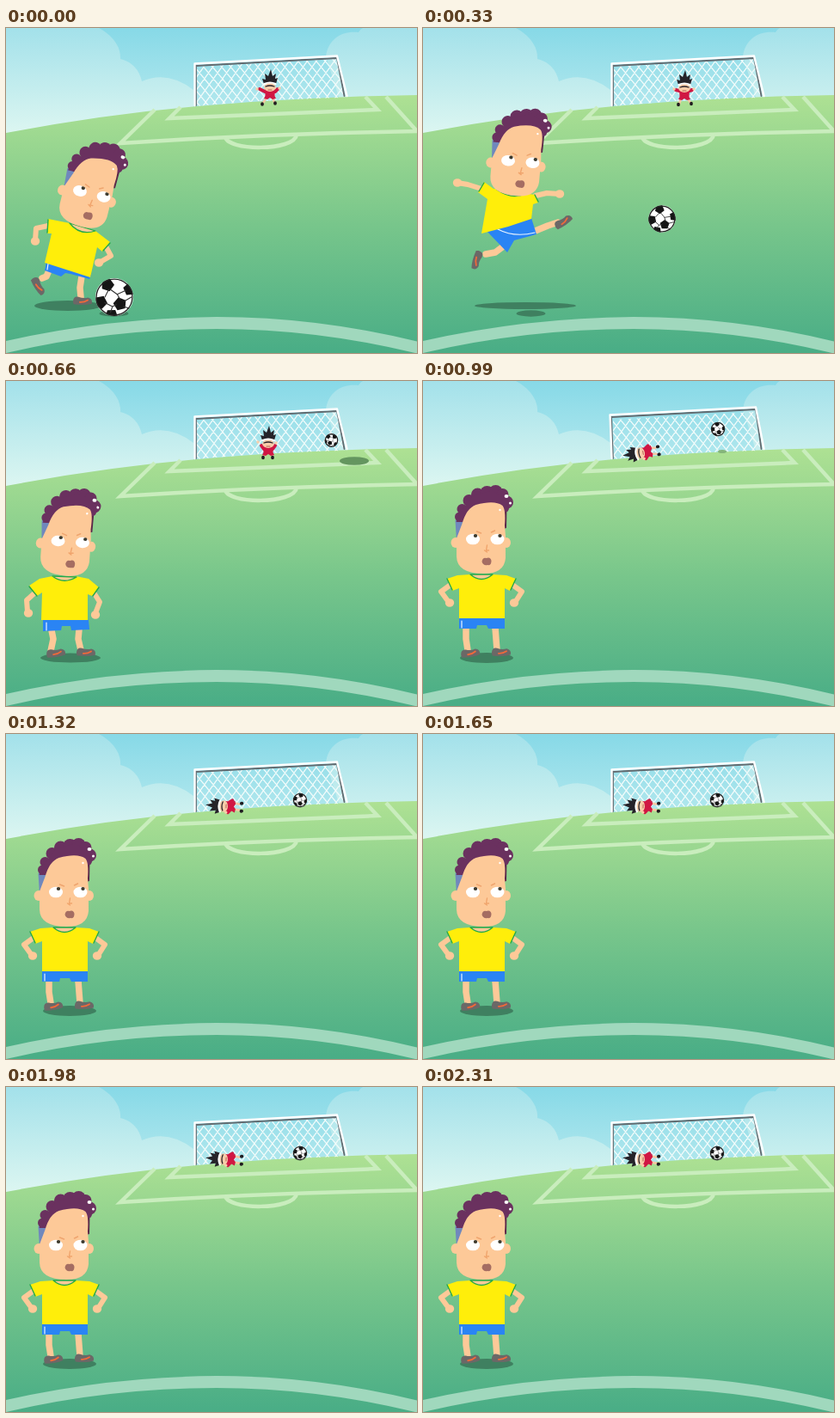
These frames come from a looping animation (478x378 px, 3300 ms). An HTML page:

```html
<!DOCTYPE html>
<html lang="en">
<head>
<meta charset="utf-8">
<title>Penalty kick</title>
<style>
html, body { margin: 0; width: 100%; height: 100%; overflow: hidden; }
svg { display: block; width: 100vw; height: 100vh; }
</style>
</head>
<body>
<svg viewBox="0 0 478 378" fill="none">
  <defs>
    <linearGradient id="sky" x2="0" y2="1"><stop stop-color="#87d9e7"/><stop offset="1" stop-color="#c4eef0"/></linearGradient>
    <linearGradient id="cloud" gradientUnits="userSpaceOnUse" x1="0" y1="0" x2="0" y2="122"><stop stop-color="#a3e1ea"/><stop offset="1" stop-color="#dcf6f1"/></linearGradient>
    <linearGradient id="grass" gradientUnits="userSpaceOnUse" x1="0" y1="78" x2="0" y2="378"><stop stop-color="#aee193"/><stop offset=".5" stop-color="#78c68b"/><stop offset="1" stop-color="#49ad86"/></linearGradient>
    <clipPath id="netClip"><path d="M221 45L385 36L393 81Q300 83 221 91Z"/></clipPath>
    <clipPath id="ballClip"><circle r="1"/></clipPath>
  </defs>
  <path fill="url(#sky)" d="M0 0H478V130H0Z"/>
  <path fill="url(#cloud)" d="M0 0H108C123 8 134 21 133 36Q153 41 158 62Q188 49 218 72V130H0Z"/>
  <path fill="url(#cloud)" d="M478 0H415Q411 2 410 5C390 3 375 13 372 33L390 90H478Z"/>
  <path fill="url(#grass)" d="M0 122Q110 101 222 91Q345 80 478 78V378H0Z"/>
  <g stroke="#c9edbd" stroke-width="4.5">
    <path d="M173 95L133 134Q300 123 478 120L442 80"/>
    <path d="M203 92L190 105L432 95L418 80"/>
    <path d="M255 126C256 143.500 336 143.500 338 124"/>
  </g>
  <path fill="#a0d8bd" d="M0 364Q120 337 245 336Q361 336 478 364.500V378H0Q120 350 245 350Q361 350 478 378.500V364Z" fill-rule="evenodd" style="display:none"/>
  <path fill="#a0d8bd" d="M0 364Q120 337 245 336Q361 336 478 364.500V378.500Q361 350 245 350Q120 350 0 378Z"/>
  <g id="scene"></g>
</svg>
<script>
const SKIN = '#fdc998', RED = '#d01743', STEP = 330, LOOP = 3300;

const path = (d, fill) => `<path d="${d}" fill="${fill}"/>`;
const line = (d, color, width) =>
  `<path d="${d}" stroke="${color}" stroke-width="${width}" stroke-linecap="round" stroke-linejoin="round"/>`;
const oval = (x, y, rx, ry, fill) => `<ellipse cx="${x}" cy="${y}" rx="${rx}" ry="${ry}" fill="${fill}"/>`;
const dot = (x, y, r, fill) => oval(x, y, r, r, fill);
const place = ([x, y, turn = 0, size = 1], body) =>
  `<g transform="translate(${x} ${y}) rotate(${turn}) scale(${size})">${body}</g>`;

// Head drawn around the point midway between the eyes
const curls = [[-30, -26, 5.5], [-27, -35, 6], [-19, -45, 7], [-9, -52, 7.5], [2, -54, 8],
  [12, -55, 8], [20, -52, 7], [25, -43, 7.5], [23, -36, 4.5]];
const head = [
  path('M-35 -22L-24 -28L-24 -14L-33.500 2Z', '#7088bd'),
  path('M18 -40L25 -38L24.500 -13L21 -12Z', '#5a2848'),
  curls.map(([x, y, r]) => dot(x, y, r, '#6a315f')).join(''),
  path('M-34 -20L-30 -30L-15 -50L8 -57L27 -45L20 -32L-24 -20Z', '#6a315f'),
  oval(-34.5, 4, 5.5, 6, SKIN), oval(24.5, 4, 5, 6, SKIN),
  path('M-33.500 -1L-27 -18Q-22 -36 -11 -40Q11 -46 20 -39Q24 -34 22.500 -16L23.500 -4V22Q22 40 -2 40Q-33 40 -33.500 20Z', SKIN),
  oval(-14.5, 0, 8, 6.3, '#fff'), oval(14, 0, 8, 6.3, '#fff'),
  oval(-11.5, -4, 2.2, 1.9, '#3d3a2e'), oval(17, -4, 2.2, 1.9, '#3d3a2e'),
  line('M-10 -9L-5 -7M7 -8L11 -10', '#efa56f', 1.5),
  line('M2 7L1 13H4M-1 13L2 15', '#f0a46c', 1.4),
  path('M-4 26Q-3 21 1 22Q6 20 7 25Q7 31 3 30Q-3 31 -4 26Z', '#a56d62'),
  oval(24.5, -50, 2.4, 2, '#fff'), dot(29, -42, 1.5, '#fff'), dot(17, -34, 1.2, '#fff')
].join('');

const shoe = path('M-11 2Q-11 -5 -5 -4Q1 -2 6 -4Q12 -3 11 3Q2 6 -10 5Z', '#6b6867') +
  line('M-3 2Q2 2 6 -1', '#f2683a', 1.8);

const shadow = (s, color = '#3f8060') => oval(...s, color);

function player({ at, shade, arms, hands, legs, shoes, shorts, stripe, shirt, cuffs, collar }) {
  return shadow(shade) + line(legs, SKIN, 7.5) + shoes.map(s => place(s, shoe)).join('') +
    path(shorts, '#2a84f4') + line(stripe, '#e9f4ff', 1.2) +
    line(arms, SKIN, 6) + hands.map(([x, y]) => oval(x, y, 5.2, 4.8, SKIN)).join('') +
    path(shirt, '#ffee0a') + line(cuffs, '#25a949', 1.4) +
    path(collar, SKIN) + line(collar, '#25a949', 1.3) + place(at, head);
}

const runUp = player({
  at: [100, 193, 14], shade: [72, 323, 39, 6],
  arms: 'M49 230L35 233L34 247M116 254L122 265L110 272', hands: [[34, 248], [108, 273]],
  legs: 'M50 282L47 289L42 291M88 289L86 302L87 313', shoes: [[38, 300, 62], [89, 317, 4]],
  shorts: 'M47 272L99 287L97 292L75 286L69 285L64 289L45 282Z', stripe: 'M49 274L48 281',
  shirt: 'M49 222L74 227L104 236L121 249L112 260L106 255L98 290L45 273L53 239L48 239Z',
  cuffs: 'M49 223L48 238M121 250L113 259', collar: 'M74 227Q86 242 104 236Z'
});
const strike = player({
  at: [113.5, 155.5, 5], shade: [119, 323, 59, 4],
  arms: 'M68 187L52 182L40 180M131 195L144 192L158 193', hands: [[40, 180], [159, 193]],
  legs: 'M96 252L84 261L73 263M128 237L145 230L157 226', shoes: [[63, 270, 110], [163, 225, -30]],
  shorts: 'M74 236L126 221L132 240L106 247L98 261Z', stripe: 'M87 234Q106 244 130 238',
  shirt: 'M71 179L82 187L130 194L134 203L128 205L126 222L99 231L68 239L75 199L64 191Z',
  cuffs: 'M71 180L65 190M130 194L134 202', collar: 'M86 188Q103 200 119 193Z'
});
const land = player({
  at: [75, 187, 4], shade: [75, 322, 35, 5.5],
  arms: 'M34 246L24 255L25 268M102 246L109 257L104 270', hands: [[26, 270], [104, 272]],
  legs: 'M53 290L55 300L52 314M85 289L84 300L87 313', shoes: [[58, 316, -4], [93, 315, 4]],
  shorts: 'M43 278H96L97 289L76 290L75 285H65L64 290L43 291Z', stripe: 'M47 281V290',
  shirt: 'M54 227L39 230L27 238L36 250L42 246L41 278H95L95 248L100 250L108 240L96 230L81 227Z',
  cuffs: 'M27 239L36 250M108 240L101 250', collar: 'M54 227Q67 237 82 228Z'
});
const stand = player({
  at: [72.5, 184], shade: [74, 322, 31, 6],
  arms: 'M32 237L21 245L29 256M104 237L115 245L108 256', hands: [[31, 258], [106, 258]],
  legs: 'M50 287L50 300L52 313M84 287L85 300L86 313', shoes: [[55, 316, -5], [91, 315, 3]],
  shorts: 'M42 276H95V288H76L74 284H63L62 288H42Z', stripe: 'M45 279V287',
  shirt: 'M55 225L40 226L28 230L34 244L42 241V276H95V241L101 244L108 230L97 226L81 225Z',
  cuffs: 'M28 230L34 243M108 230L102 243', collar: 'M55 225Q68 236 81 225Z'
});

// Unit ball, scaled to its radius
const pentagon = (x, y, turn) => 'M' + [0, 1, 2, 3, 4].map(i => {
  const a = turn + i * Math.PI * 2 / 5;
  return `${(x + .36 * Math.cos(a)).toFixed(3)} ${(y + .36 * Math.sin(a)).toFixed(3)}`;
}).join('L') + 'Z';
const patches = [[-.36, -.65], [.3, .36], [-.72, .27], [.82, -.42], [-.15, .98]];
const ballBody = dot(0, 0, 1, '#fff') + '<g clip-path="url(#ballClip)">' +
  patches.map(([x, y], i) => path(pentagon(x, y, i * .7), '#151515')).join('') +
  line('M-.2 -.4L.15 -.15L.3 .1M.15 -.15L.6 -.35M-.3 -.4L-.5 0M-.5 .3L-.1 .5L.1 .4M-.1 .5L-.2 .8M.5 .5L.8 .6M.55 .2L.9 0', '#333', .05) +
  '</g>';
const ball = (x, y, r, turn = 0) =>
  place([x, y, turn, r], ballBody + `<circle r=".95" stroke="#222" stroke-width="${1.3 / r}"/>`);

// Goalkeeper drawn around the face
const spikes = path('M-7 -4L-9 -10L-5 -9L-6 -16L-2 -13L1 -21L3 -13L7 -16L6 -10L9 -11L7 -4Z', '#252329');
const keeperHead = spikes + oval(0, 0, 6.8, 5, '#f9cda9') +
  line('M-6.5 -4Q0 -7 6.5 -4', '#fff', 2.2) + line('M-5 -1Q0 -3 5 -1', '#29232a', 1.3) + line('M-2 3H2', '#b65e52', 1);
const keeper = (at, arms, hands, legs, feet) => place(at,
  line(legs, '#f6c7a4', 2.6) + line(arms, RED, 4) +
  path('M-6 2H6L5.500 10L7 13L3 14L0 12L-3 14L-7 13L-5.500 10Z', RED) +
  hands.map(([x, y]) => dot(x, y, 1.7, '#f9cda9')).join('') +
  feet.map(([x, y]) => oval(x, y, 1.9, 2.2, '#211c20')).join('') + keeperHead);

const keeperWide = keeper([307, 69], 'M-6 5L-12 2M6 5L9 2', [[-15, 2], [11, 1]], 'M-4 12L-8 18M3 12L5 17', [[-9, 19.5], [6, 18.5]]);
const keeperSet = keeper([304, 70], 'M-6 3L-10 2M6 3L9 2', [[-12, 1], [11, 1]], 'M-4 12L-6 18M4 12L7 17', [[-7, 19], [8, 18]]);
const keeperCrouch = keeper([305, 73], 'M-5 6L-8 2M5 6L8 2', [[-12, -2], [9, -1]], 'M-4 11L-5 14M4 11L5 14', [[-6, 16], [5, 16]]);
const lying = turn => keeper([253, 84, turn], 'M-5 7L-7 5M5 7L7 10', [[-7, 3]], 'M-3 13L-4 18M4 13L3 18', [[-5, 21], [4, 21]]);

const netLines = () => {
  let d = '';
  for (let x = 150; x < 470; x += 10.5) d += `M${x} 25L${x + 58} 95M${x} 25L${x - 50} 95`;
  return d;
};
const net = `<g clip-path="url(#netClip)">${line(netLines(), '#f3fcfb', 1.25)}</g>`;

// A shaken goal frame spreads outwards and up
const goal = (shake = 0) => {
  const left = 219.5 - shake, right = 385 + shake, top = 41.5 - shake, rise = 9;
  return net +
    line(`M${left + 1} ${top + 2.500}L${right} ${top - rise + 2.500}L393.500 79M${left + 1.500} ${top + 2}L221 90`, '#626b70', 1.8) +
    line(`M${left} ${top}L${right} ${top - rise}L396.500 79M${left} ${top}L219.500 90`, '#fff', 2.4);
};

const spot = shadow([125.5, 332, 17, 3.7]);
const rest = goal() + lying(-88) + shadow([342, 83, 6, 2.3], '#75a66f') + ball(342, 77, 8, 40) + stand;
const poses = [
  goal() + keeperWide + spot + runUp + ball(126, 313, 22),
  goal() + keeperSet + spot + strike + ball(278, 222, 15.7, 15),
  goal() + keeperCrouch + shadow([405, 93, 17, 4.8], '#64965f') + ball(378.5, 69, 7.6, 70) + land,
  goal(2) + lying(-100) + shadow([348, 82, 5, 2], '#85b57a') + ball(343, 56, 8, 20) + stand,
  rest
];

const scene = document.getElementById('scene');
scene.innerHTML = poses.map(p => `<g visibility="hidden">${p}</g>`).join('');
const layers = [...scene.children];

function draw(time) {
  const current = Math.min(Math.floor(time % LOOP / STEP), poses.length - 1);
  layers.forEach((layer, i) => layer.setAttribute('visibility', i === current ? 'visible' : 'hidden'));
}

let start;
function tick(now) {
  start ??= now;
  draw(now - start);
  requestAnimationFrame(tick);
}
draw(0);
requestAnimationFrame(tick);
</script>
</body>
</html>
```
